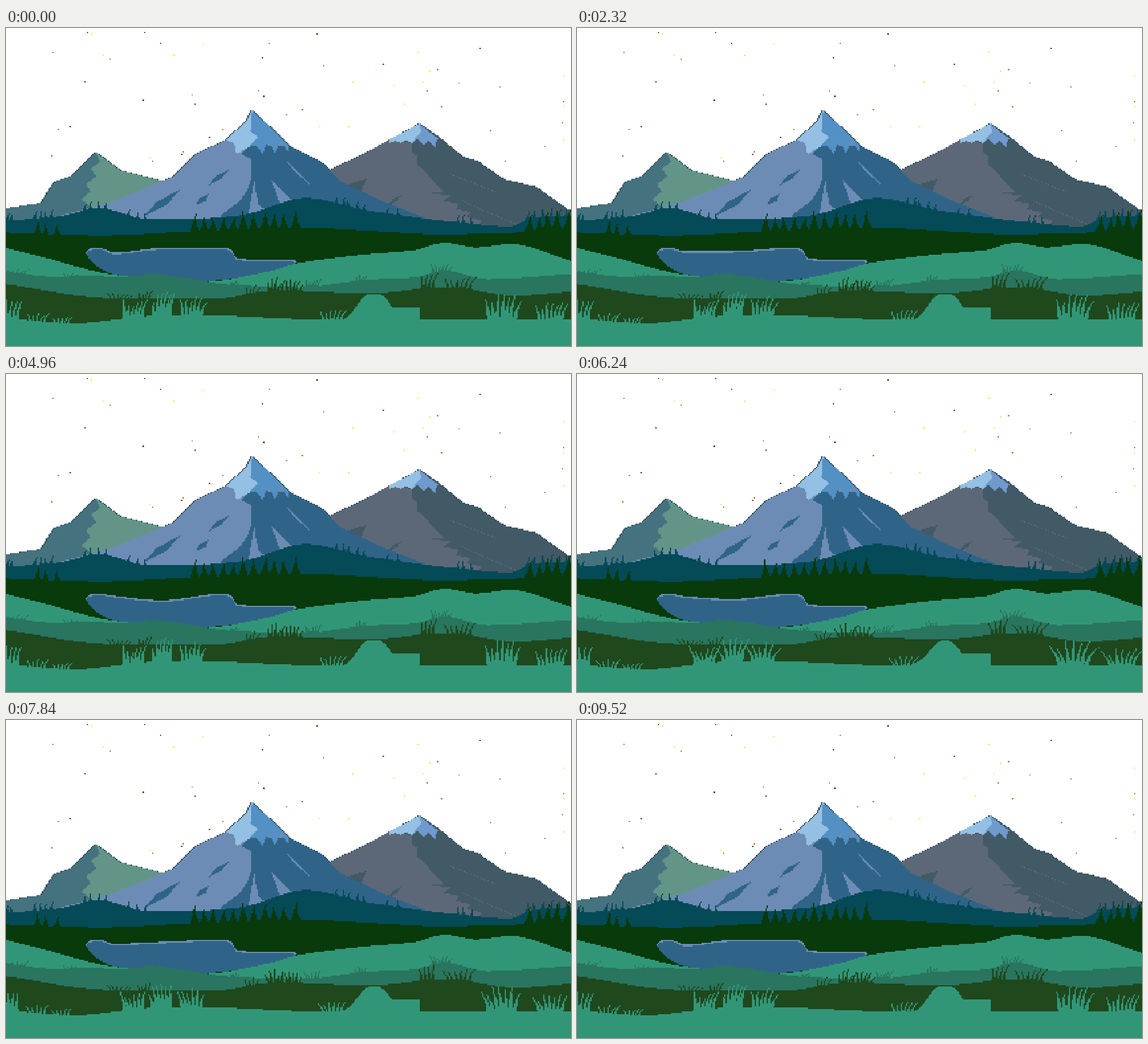
Recreate the animation shown at these times as an HTML page with a canvas. Size 998 by 561 pixels, loop 9600 ms.

```html
<!DOCTYPE html>
<html lang="en">
<head>
<meta charset="utf-8">
<title>Mountain meadow</title>
<style>
html, body { margin: 0; width: 100%; height: 100%; overflow: hidden; background: #fff; }
canvas { display: block; width: 998px; height: 561px; image-rendering: pixelated; }
</style>
</head>
<body>
<canvas id="view" width="426" height="240"></canvas>
<script>
const LOOP = 9600, STEP = 80, W = 426, H = 240;
const SX = W / 998, SY = H / 561, TAU = Math.PI * 2;
const view = document.getElementById('view').getContext('2d');
let ctx = view;

const C = {
  farDark: '#45727f', farLight: '#629587', slate: '#5c6878', slateDark: '#425a66',
  blue: '#6d8cb5', deep: '#2f6488', snow: '#94c0e4', snowDark: '#5390c4', snowShade: '#7099cd',
  teal: '#054a57', forest: '#083a0b', grass: '#319678', mid: '#29755f', moss: '#1f481d', rim: '#34505f'
};

const lerp = (a, b, u) => a + (b - a) * u;
const rand = n => { const v = Math.sin(n * 127.1 + 11.7) * 43758.5453; return v - Math.floor(v); };

// Hard-edged scanline fill; points are a flat x,y list in stage pixels.
function poly(color, p, grow = 0) {
  ctx.fillStyle = color;
  const n = p.length / 2, ys = p.filter((v, i) => i % 2).map(v => v * SY);
  const y0 = Math.max(0, Math.floor(Math.min(...ys))), y1 = Math.min(H - 1, Math.ceil(Math.max(...ys)));
  for (let y = y0; y <= y1; y++) {
    const hits = [], c = y + 0.5;
    for (let i = 0; i < n; i++) {
      const j = (i + 1) % n, a = ys[i], b = ys[j];
      if (a <= c !== b <= c) hits.push(SX * lerp(p[2 * i], p[2 * j], (c - a) / (b - a)));
    }
    hits.sort((a, b) => a - b);
    for (let i = 0; i + 1 < hits.length; i += 2) {
      const l = Math.round(hits[i]) - grow;
      ctx.fillRect(l, y, Math.max(1, Math.round(hits[i + 1]) + grow - l), 1);
    }
  }
}

// Monotone curve through key points, returned as y(x).
function ridge(...p) {
  const n = p.length / 2, X = i => p[2 * i], Y = i => p[2 * i + 1];
  const rise = i => (Y(i + 1) - Y(i)) / (X(i + 1) - X(i));
  const slope = i => {
    if (i === 0 || i === n - 1) return rise(Math.min(i, n - 2));
    const a = rise(i - 1), b = rise(i);
    return a * b <= 0 ? 0 : 2 * a * b / (a + b);
  };
  return x => {
    let i = 0;
    while (i < n - 2 && x > X(i + 1)) i++;
    const d = X(i + 1) - X(i), u = Math.min(1, Math.max(0, (x - X(i)) / d)), v = 1 - u;
    return v * v * (1 + 2 * u) * Y(i) + u * u * (3 - 2 * u) * Y(i + 1) + u * v * d * (v * slope(i) - u * slope(i + 1));
  };
}

function between(color, top, bottom, x0 = 0, x1 = 998) {
  ctx.fillStyle = color;
  for (let x = Math.round(x0 * SX); x < Math.round(x1 * SX); x++) {
    const s = (x + 0.5) / SX, y = Math.round(top(s) * SY);
    ctx.fillRect(x, y, 1, Math.max(0, Math.round(bottom(s) * SY) - y));
  }
}
const band = (color, top, bottom) => between(color, top, () => bottom);

// Jagged line from one point to another, teeth pushed out along (dx, dy).
function ragged(x1, y1, x2, y2, teeth, dx, dy) {
  const out = [];
  for (let i = 0; i <= teeth * 2; i++) {
    const u = i / teeth / 2, k = i % 2 * (0.7 + 0.6 * rand(i + x1));
    out.push(lerp(x1, x2, u) + dx * k, lerp(y1, y2, u) + dy * k);
  }
  return out;
}

// Narrow gully, widest a third of the way down.
function gully(color, x1, y1, x2, y2, w) {
  const x = lerp(x1, x2, 0.5), y = lerp(y1, y2, 0.5);
  poly(color, [x1, y1, x + w, y + w * 0.4, x2, y2, x - w, y - w * 0.4]);
}

function mountains() {
  const far = [0,318, 62,309, 86,272, 115,262, 159,220, 203,252, 278,270, 278,345, 0,345];
  const right = [560,256, 634,222, 730,169, 768,196, 805,227, 832,235, 878,267, 935,280, 998,325, 998,360, 560,360];
  const main = [85,334, 180,309, 297,262, 335,223, 388,198, 424,165, 435,145, 500,208, 555,236, 592,271, 660,303, 742,336, 742,345, 85,345];

  poly(C.farDark, far);
  poly(C.farLight, [...ragged(133,302, 159,222, 3, 14, 0), 159,220, 203,252, 278,270, 230,310, 150,316]);

  poly(C.slateDark, right);
  poly(C.slate, [560,256, 634,222, 676,197, ...ragged(716,203, 738,250, 2, -6, 4), 752,268, 776,291, ...ragged(752,291, 835,348, 4, 18, -2), 560,350]);
  poly(C.slateDark, [637,266, 626,291, 602,277]);
  gully(C.slateDark, 698,295, 676,313, -4);
  gully(C.slate, 783,258, 866,290, -8);
  gully(C.slate, 803,304, 909,350, -13);
  poly(C.snow, [730,169, 676,197, ...ragged(678,203, 716,203, 2, 0, -5), 733,183]);
  poly(C.snowShade, [730,169, 763,195, ...ragged(757,210, 716,203, 2, 0, -9), 733,183]);

  poly(C.blue, main);
  poly(C.deep, [432,206, ...main.slice(14, 26), 372,345, 380,330, 412,306, 427,285, 434,262, 434,232, 415,222]);
  poly(C.blue, [438,272, 446,310, 460,323, 428,332]);
  poly(C.blue, [469,268, 509,309, 486,318]);
  gully(C.blue, 495,235, 536,276, -5);
  gully(C.deep, 393,250, 358,278, -5);
  gully(C.deep, 308,285, 242,333, -8);
  gully(C.deep, 358,293, 336,312, -6);
  poly(C.snow, [435,145, 424,165, 388,198, 403,203, 407,222, 432,209, 446,193, 432,182]);
  poly(C.snowDark, [435,145, 500,207, ...ragged(497,218, 453,222, 2, 0, -20), 442,207, 431,208, 446,193, 432,182]);

  // Dark stair-step rim, visible only against the sky.
  ctx.globalCompositeOperation = 'destination-over';
  for (const outline of [far, right, main]) poly(C.rim, outline, 1);
}

function sky() {
  const tints = ['#8c7c1e', '#f2e04c', '#5a5214', '#8c7c1e', '#f2e04c', '#8e3413', '#9a9a8c'];
  ctx.fillStyle = '#fff';
  ctx.fillRect(0, 0, W, H);
  for (let i = 0; i < 56; i++) {
    ctx.fillStyle = tints[i % tints.length];
    ctx.fillRect(Math.floor(rand(i) * W), Math.floor(2 + rand(i + 300) * 100), 1, 1);
  }
}

// Teardrop outline gliding along an arc over the main peak.
function meteor(t) {
  if (t < 2960 || t > 3820) return;
  const head = Math.min(72, -35 + (t - 2960) * 0.178);
  const tail = -35 + Math.max(0, t - 3440) * 0.28;
  if (tail >= head) return;
  ctx.fillStyle = '#ffff00';
  const dot = (deg, out, along) => {
    const a = deg * TAU / 360, r = 154 + out;
    const x = 412 + r * Math.sin(a) + along * Math.cos(a);
    const y = 262 - r * Math.cos(a) + along * Math.sin(a);
    ctx.fillRect(Math.round(x * SX - 1), Math.round(y * SY - 1), 2, 2);
  };
  for (let u = 0; u <= 1; u += 0.005) {
    const a = lerp(tail, head, u), w = 0.5 + 8.5 * u ** 4;
    dot(a, w, 0);
    dot(a, -w, 0);
  }
  for (let p = 0; p <= Math.PI; p += 0.1) dot(head, 9 * Math.cos(p), 9 * Math.sin(p));
}

const hills = {
  teal: ridge(0,340, 90,333, 165,318, 250,337, 320,337, 410,331, 530,300, 635,321, 800,343, 890,350, 930,335, 998,330),
  forest: ridge(0,361, 170,366, 325,359, 520,352, 660,359, 760,364, 880,362, 998,353),
  meadow: ridge(0,388, 60,403, 190,435, 345,448, 470,428, 515,415, 640,399, 720,392, 775,379, 830,387, 890,381, 998,411),
  mid: ridge(0,430, 90,439, 150,437, 200,440, 260,435, 400,453, 520,457, 640,444, 720,440, 775,428, 850,443, 998,434),
  moss: ridge(0,452, 180,476, 360,478, 480,463, 640,468, 780,457, 900,472, 998,465),
  front: ridge(0,512, 120,521, 260,508, 350,507, 550,514, 998,514)
};

// Evenly spaced spires with a little jitter, standing on a hill.
function trees(color, hill, x0, x1, count, height, wave) {
  for (let i = 0; i < count; i++) {
    const x = lerp(x0, x1, i / (count - 1)) + 5 * rand(i + x0) - 2.5, base = hill(x) + 4;
    const top = base - height * (0.8 + 0.35 * rand(i * 3 + x0)), s = 2 * wave(i * 1.7), half = height * 0.32;
    const my = lerp(top, base, 0.55);
    poly(color, [x + s, top, x + half * 0.4, my, x + half, base, x - half, base, x - half * 0.4, my]);
  }
}

// Fan of blades; the whole fan leans with the wind.
function tuft(color, hill, cx, width, height, count, wave) {
  for (let i = 0; i < count; i++) {
    const u = count > 1 ? i / (count - 1) * 2 - 1 : 0, base = hill(cx) + 3;
    const root = cx + u * width * 0.3, half = 1.5 + height * 0.06;
    const tip = cx + u * width / 2 + height * 0.16 * wave(i * 0.35);
    const top = base - 3 - height * (0.5 + 0.5 * rand(i + cx));
    const mx = lerp(root, tip, 0.3), my = (top + base) / 2;
    poly(color, [tip, top, mx + half * 0.6, my, root + half, base, root - half, base, mx - half * 0.6, my]);
  }
}

function lake(slow) {
  const top = ridge(140,397, 148,389, 165,387.5, 190,393.5 + 2.5 * slow, 275,393.5 - 5.5 * slow, 385,387, 398,392, 408,406, 430,408, 505,408, 514,413);
  const bottom = ridge(140,397, 155,416, 190,434, 300,449, 420,440, 505,420, 514,413);
  between(C.blue, top, bottom, 140, 514);
  between(C.deep, x => top(x) + 3, bottom, 140, 514);
}

// Boulder and ledge; the boulder breathes between a dome and a bell.
function rock(s) {
  const bump = x => 46 * Math.exp(-((Math.abs(x - 650) / 36) ** (2.5 + 0.5 * s)));
  between(C.grass, x => 515 - Math.max(bump(x), x > 660 ? 22 : 0), () => 520, 590, 731);
}

const layer = document.createElement('canvas');
layer.width = W;
layer.height = H;
ctx = layer.getContext('2d');
mountains();
ctx = view;

function draw(t) {
  const turn = TAU * t / LOOP;
  const wave = phase => Math.cos(4 * turn + phase);
  const row = (color, hill, ...spec) => trees(color, hill, ...spec, wave);
  const clump = (color, hill, ...spec) => tuft(color, hill, ...spec, wave);

  sky();
  meteor(t);
  ctx.drawImage(layer, 0, 0);

  band(C.teal, hills.teal, 370);
  for (const [x0, x1, n] of [[2, 12, 2], [50, 80, 4], [140, 175, 4], [218, 244, 3], [585, 630, 5], [675, 690, 2], [796, 820, 3], [920, 990, 6]])
    row(C.teal, hills.teal, x0, x1, n, 16);
  band(C.forest, hills.forest, 460);
  row(C.forest, hills.forest, 55, 88, 3, 25);
  row(C.forest, hills.forest, 331, 511, 11, 31);
  row(C.forest, hills.forest, 925, 992, 5, 34);

  lake(Math.cos(turn));
  band(C.grass, hills.meadow, 465);
  band(C.mid, hills.mid, 485);
  for (const [x, w, h, n] of [[20, 40, 7, 5], [112, 24, 6, 4], [256, 28, 5, 4], [402, 16, 6, 5], [541, 30, 14, 5], [626, 20, 10, 4], [768, 42, 14, 6]])
    clump(C.mid, hills.mid, x, w, h, n);

  band(C.moss, hills.moss, 530);
  for (const [x, w, h, n] of [[200, 46, 9, 6], [244, 24, 15, 4], [434, 26, 14, 4], [475, 36, 24, 5], [508, 34, 20, 5], [744, 30, 26, 4], [800, 60, 22, 6]])
    clump(C.moss, hills.moss, x, w, h, n);

  band(C.grass, hills.front, 561);
  rock(wave(0));
  for (const [x, w, h, n] of [[10, 30, 36, 4], [55, 40, 16, 5], [98, 36, 14, 5], [225, 48, 32, 6], [275, 46, 46, 6], [328, 52, 36, 6], [576, 50, 18, 6], [876, 74, 48, 7], [962, 64, 32, 7]])
    clump(C.grass, hills.front, x, w, h, n);
}

const start = performance.now();
let last = -1;
function tick() {
  const step = Math.floor(Math.max(0, performance.now() - start) % LOOP / STEP);
  if (step !== last) draw((last = step) * STEP);
  requestAnimationFrame(tick);
}
tick();
</script>
</body>
</html>
```
